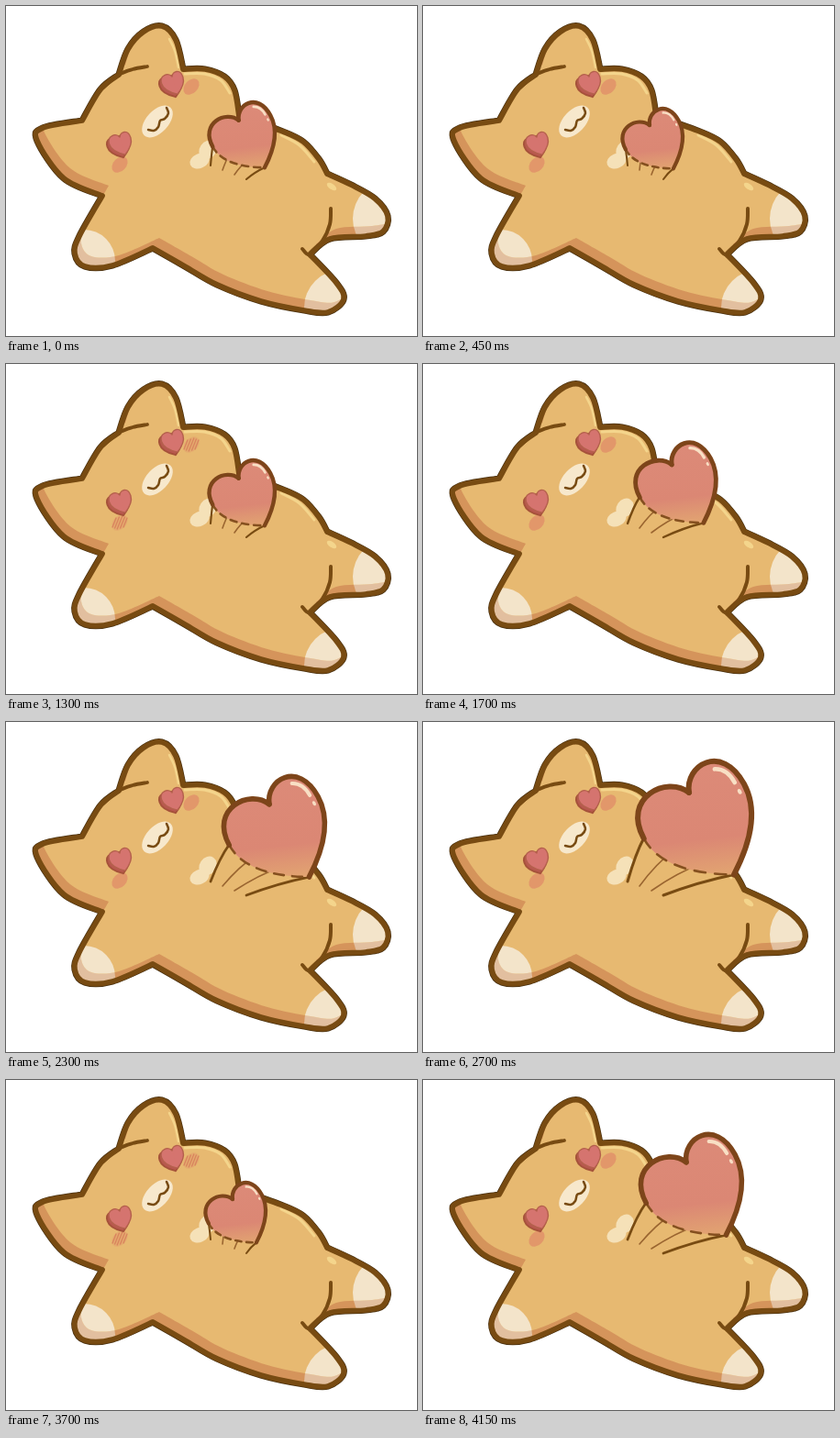
Animation, 448 px wide and 360 px high, one loop 4200 ms. Source, as an HTML page with a canvas:

```html
<!DOCTYPE html>
<html lang="en">
<head>
<meta charset="utf-8">
<title>Beating heart cat</title>
<style>
html, body { margin: 0; width: 100%; height: 100%; overflow: hidden; background: #fff; }
canvas { display: block; width: 448px; height: 360px; }
</style>
</head>
<body>
<canvas id="stage" width="448" height="360"></canvas>
<script>
const ctx = document.getElementById('stage').getContext('2d');
const LINE = '#784b12', FUR = '#e7b971', SHADE = '#d5945b', GLOW = '#f4d58c';
const CREAM = '#f3e4ca', CREAM_SHADE = '#e2bf9f';

const SLOT = 50, LOOP = 4200, TILT = -0.5;
const HELD = [700, 850, 1400, 1700, 1850, 2000, 2150, 2500, 3100, 3450, 3750, 3950];
// Three beats of eight drawings; each digit picks a growth step.
const BEATS = '011023420110234311102343';
const GROWTH = [0.1, 0, 0.38, 0.76, 1];

// Key points of the outline; a new array starts after each corner.
const BODY = [
  [123,75, 133,47, 150,28, 170,22, 185,37, 193,69],
  [193,69, 217,69, 238,77, 249,92, 254,120],
  [254,120, 302,137, 324,148, 341,167, 350,183],
  [350,183, 376,195, 402,210, 416,229, 411,246, 392,251, 353,254, 331,271],
  [331,271, 360,302, 368,320, 351,334, 325,332, 278,322, 230,304, 195,284, 160,264],
  [160,264, 116,283, 86,284, 75,270, 80,251, 105,207],
  [105,207, 63,188, 34,147, 40,133, 83,125],
  [83,125, 103,91, 123,75]
];

function spline(path, p, join) {
  const n = p.length / 2;
  const at = i => { i = Math.max(0, Math.min(n - 1, i)) * 2; return [p[i], p[i + 1]]; };
  if (!join) path.moveTo(p[0], p[1]);
  for (let i = 0; i < n - 1; i++) {
    const [a, b, c, d] = [at(i - 1), at(i), at(i + 1), at(i + 2)];
    path.bezierCurveTo(b[0] + (c[0] - a[0]) / 6, b[1] + (c[1] - a[1]) / 6,
      c[0] - (d[0] - b[0]) / 6, c[1] - (d[1] - b[1]) / 6, c[0], c[1]);
  }
  return path;
}

// One side of a heart with its notch at 0,0 and its tip at 0,1.
const lobe = w => `M0,0 C${w * 0.18},-.28 ${w},-.3 ${w},.2`;
const flank = w => `C${w},.58 ${w * 0.4},.85 0,1`;
const HEART = {
  right: new Path2D(lobe(0.56) + flank(0.56)),
  left: new Path2D(lobe(-0.66)),
  under: new Path2D('M-.66,.2' + flank(-0.66)),
  whole: new Path2D(lobe(0.56) + flank(0.56) + lobe(-0.66) + flank(-0.66)),
  shine: new Path2D('M.36,-.09 Q.48,-.03 .48,.14')
};

function stroke(path, color, width) {
  ctx.strokeStyle = color;
  ctx.lineWidth = width;
  ctx.stroke(path);
}

function fill(path, color) {
  ctx.fillStyle = color;
  ctx.fill(path);
}

function oval(x, y, rx, ry, angle, color) {
  const path = new Path2D();
  path.ellipse(x, y, rx, ry, angle, 0, Math.PI * 2);
  fill(path, color);
}

function local(x, y, size, angle, paint) {
  ctx.save();
  ctx.translate(x, y);
  ctx.rotate(angle);
  ctx.scale(size, size);
  paint();
  ctx.restore();
}

const line = p => spline(new Path2D(), p);
const mix = (a, b, k) => a + (b - a) * k;

const body = new Path2D();
BODY.forEach((s, i) => spline(body, s, i > 0));
body.closePath();

function drawPaws(color) {
  oval(85, 278, 34, 34, 0, color);
  oval(420, 232, 42, 42, 0, color);
  oval(366, 329, 41, 41, 0, color);
}

function drawBody() {
  stroke(body, '#49300f', 7.2);
  ctx.save();
  ctx.clip(body);
  fill(body, SHADE);
  drawPaws(CREAM_SHADE);
  // Light falls from the upper right, so the lit area is the body moved that way.
  ctx.translate(7, -11);
  ctx.clip(body);
  ctx.translate(-7, 11);
  fill(body, FUR);
  drawPaws(CREAM);
  ctx.restore();
  stroke(line([178,36, 184,49, 188,67]), GLOW, 2.5);
  stroke(line([195,74, 216,74, 234,81, 244,95]), GLOW, 3);
  stroke(line([300,141, 320,152, 336,170]), GLOW, 3);
  oval(355, 197, 6, 3, 0.6, GLOW);
  stroke(body, LINE, 5.8);
  stroke(line([106,89, 123,75, 138,69, 154,66]), LINE, 3.8);
  stroke(line([354,221, 353,238, 345,256, 331,271, 323,265]), LINE, 4);
}

function drawBlush(x, y, hatched) {
  oval(x, y, 10, 7, -0.8, `rgba(222,132,103,${hatched ? 0.25 : 0.65})`);
  for (let i = -2; hatched && i <= 2; i++) {
    const h = 7 - Math.abs(i);
    stroke(line([x + i * 3 - h * 0.4, y + h, x + i * 3 + h * 0.4, y - h]), 'rgba(208,105,83,.6)', 1.3);
  }
}

function drawEye(x, y) {
  local(x - 2, y + 3, 20, -0.3, () => {
    fill(HEART.whole, '#b9584f');
    stroke(HEART.whole, '#a5523a', 0.1);
  });
  local(x, y, 20, -0.3, () => {
    fill(HEART.whole, '#d5746f');
    stroke(HEART.whole, '#b4604c', 0.07);
  });
}

function drawFace(frame) {
  const hatched = Math.abs(frame % 10 - 4) < 2;
  drawBlush(124, 173, hatched);
  drawBlush(202, 88, hatched);
  drawEye(124, 143);
  drawEye(181, 77);
  oval(165, 126, 21, 12, -0.82, '#f7e8cc');
  stroke(line([155,135, 161,136, 166,132, 168,125, 173,123, 177,117, 175,111]), LINE, 2.5);
}

// Skin stretches from fixed spots on the chest to the underside of the heart.
function drawCreases(x, y, size, grow) {
  const from = [x - 0.485 * size, y + 0.49 * size];
  const tip = [x - Math.sin(TILT) * size, y + Math.cos(TILT) * size];
  for (let i = 0; i < 4; i++) {
    const hx = mix(from[0], tip[0], i / 3), hy = mix(from[1], tip[1], i / 3);
    const fx = 223 + 13 * i, fy = 174 + 5 * i;
    const edge = i % 3 === 0;
    const path = new Path2D(`M${hx},${hy} Q${mix(hx, fx, 0.5)},${mix(hy, fy, 0.35)} ${fx},${fy}`);
    stroke(path, edge ? LINE : '#9a6530', edge ? 2 + grow : 1.6);
  }
}

function drawHeart(grow) {
  const size = mix(54, 102, grow);
  const x = mix(247, 290, Math.sin(grow * Math.PI / 2)), y = mix(130, 77, grow);
  drawCreases(x, y, size, grow);
  local(x, y, size, TILT, () => {
    const px = 1 / size, width = mix(4.2, 6, grow) * px;
    const tint = ctx.createLinearGradient(0.2, -0.2, -0.25, 0.9);
    tint.addColorStop(0, '#dc8a78');
    tint.addColorStop(0.65, '#db8774');
    tint.addColorStop(1, '#e2a571');
    fill(HEART.whole, tint);
    ctx.setLineDash([0.12, 0.1]);
    stroke(HEART.under, '#85501f', 2.6 * px);
    ctx.setLineDash([]);
    stroke(HEART.right, '#7d451a', width);
    stroke(HEART.left, '#7d451a', width);
    stroke(HEART.shine, '#f8dfc4', 0.045);
    oval(0.48, 0.25, 0.02, 0.03, 0, '#f8dfc4');
  });
}

function frameAt(ms) {
  const slot = Math.floor(ms / SLOT);
  return slot - HELD.filter(t => t / SLOT < slot).length;
}

function draw(ms) {
  const frame = frameAt(ms);
  ctx.clearRect(0, 0, 448, 360);
  ctx.lineCap = ctx.lineJoin = 'round';
  drawBody();
  drawFace(frame);
  oval(211, 169, 11, 8, -0.4, '#f5e1b8');
  oval(220, 157, 9, 11, 0.6, '#f5e1b8');
  drawHeart(GROWTH[BEATS[frame % BEATS.length]]);
}

const start = performance.now();
function tick() {
  draw((performance.now() - start) % LOOP);
  requestAnimationFrame(tick);
}
tick();
</script>
</body>
</html>
```
